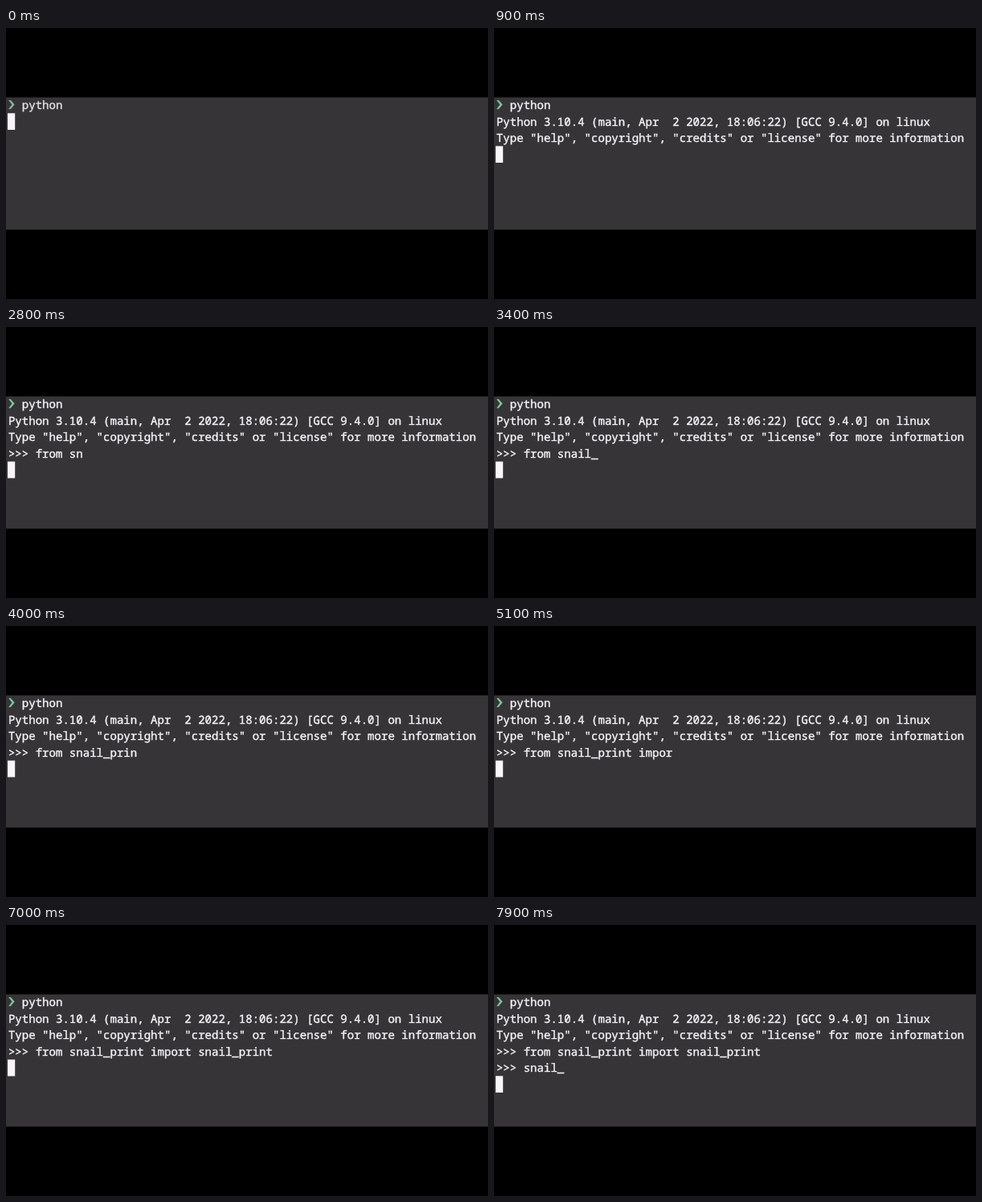
An HTML page that plays this animation: 600x338 px, repeating every 8000 ms.

```html
<!DOCTYPE html>
<html lang="en">
<head>
<meta charset="utf-8">
<title>Python session</title>
<style>
  html, body { margin: 0; width: 100%; height: 100%; overflow: hidden; background: #000; }
  svg { display: block; width: 600px; height: 338px; }
  text {
    font: 14.07px "Noto Sans Mono", "DejaVu Sans Mono", monospace;
    fill: #f6f3f9;
    stroke: #f6f3f9;
    stroke-width: 0.4px;
    white-space: pre;
    text-rendering: geometricPrecision;
  }
  #band { fill: #373437; }
  #cursor { fill: #f9f5fb; }
  #mark { fill: #7cc79a; }
  .soft #mark { fill: #86b8a4; }
  .soft text { fill: #e4e1e4; stroke: #e4e1e4; }
</style>
</head>
<body>
<svg id="stage" viewBox="0 0 600 338">
  <rect id="band" y="86.5" width="600" height="165"/>
  <path id="mark" d="M3.2 90h2.6l4.8 5.6-4.8 5.6h-2.6l4.2-5.6z"/>
  <rect id="cursor" x="2" width="9.2" height="20.7"/>
</svg>
<script>
const LOOP = 8000, TICK = 100, BANNER_AT = 900;
const LEFT = 2.9, TOP = 86, PITCH = 20.5, CELL = 8.442;
const stage = document.getElementById('stage');
const cursor = document.getElementById('cursor');

const banner = [
  'Python 3.10.4 (main, Apr  2 2022, 18:06:22) [GCC 9.4.0] on linux',
  'Type "help", "copyright", "credits" or "license" for more information'
];
// Words typed on each input line: start and time per key in ms.
const inputs = [
  [
    { word: 'from', start: 1948, pace: 151 },
    { word: ' snail_print', start: 2548, pace: 151 },
    { word: ' import', start: 4384, pace: 151 },
    { word: ' snail_print', start: 5451, pace: 149 }
  ],
  [{ word: 'snail_', start: 7210, pace: 151 }]
];

const rows = Array.from({ length: 5 }, (_, i) => {
  const el = document.createElementNS('http://www.w3.org/2000/svg', 'text');
  el.setAttribute('x', i ? LEFT : LEFT + 2 * CELL);
  el.setAttribute('y', TOP + 15 + i * PITCH);
  stage.append(el);
  return el;
});
rows[0].textContent = 'python';

function typed({ word, start, pace }, t) {
  const count = Math.floor((t - start) / pace) + 1;
  return word.slice(0, Math.max(0, count));
}

function render(t) {
  const lines = t < BANNER_AT ? [] : [...banner];
  const now = (Math.floor(t / TICK) + 1) * TICK - 1; // screen refreshes once per tick
  for (const words of inputs) {
    const text = words.map(w => typed(w, now)).join('');
    if (text) lines.push('>>> ' + text);
  }
  rows.slice(1).forEach((el, i) => {
    const value = lines[i] || '';
    if (el.textContent !== value) el.textContent = value;
  });
  cursor.setAttribute('y', TOP + (lines.length + 1) * PITCH - 0.2);
  stage.classList.toggle('soft', t < BANNER_AT);
}

const begin = performance.now();
function frame() {
  render((performance.now() - begin) % LOOP);
  requestAnimationFrame(frame);
}
render(0);
requestAnimationFrame(frame);
</script>
</body>
</html>
```
